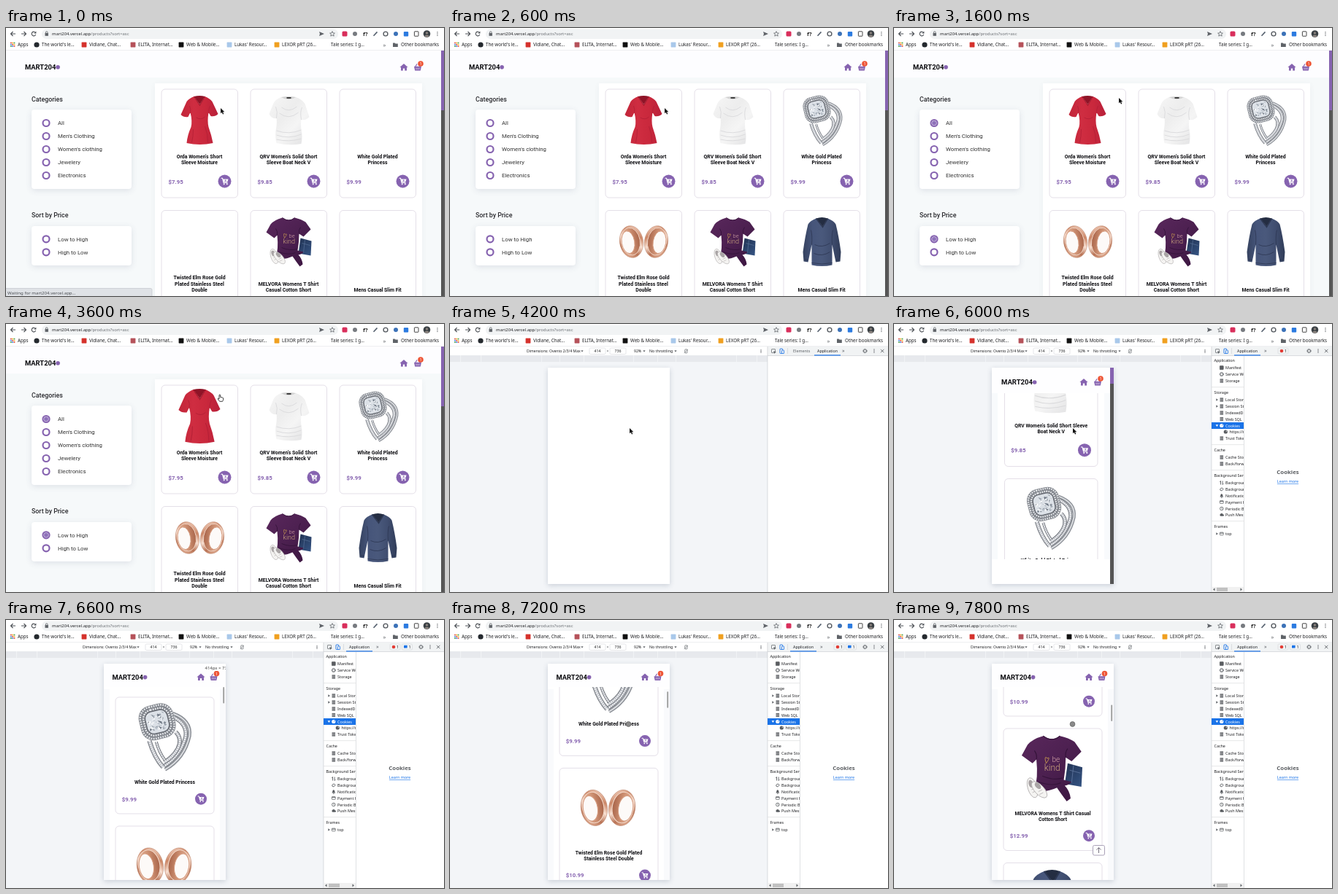
An HTML page with a canvas for the animation above (8000 ms loop, 600 by 368 pixels).

```html
<!DOCTYPE html>
<html lang="en">
<head>
<meta charset="utf-8">
<title>Shop demo</title>
<style>
html, body { margin: 0; width: 100%; height: 100%; overflow: hidden; background: #fff; }
canvas { display: block; width: 600px; height: 368px; }
</style>
</head>
<body>
<canvas id="stage"></canvas>
<script>
const W = 600, H = 368, LOOP = 8000, STEP = 200;
const UI = '"Noto Sans", sans-serif', WEB = 'Roboto, sans-serif';
const PURPLE = '#8663b0', INK = '#202124', GREY = '#5f6368', BLUE = '#1a73e8';
const canvas = document.getElementById('stage');
const c = canvas.getContext('2d');
const dpr = window.devicePixelRatio || 1;
canvas.width = W * dpr;
canvas.height = H * dpr;

function rect(x, y, w, h, fill) { c.fillStyle = fill; c.fillRect(x, y, w, h); }

function paint(fill, stroke, lw) {
  if (fill) { c.fillStyle = fill; c.fill(); }
  if (stroke) { c.strokeStyle = stroke; c.lineWidth = lw; c.stroke(); }
}

function box(x, y, w, h, r, fill, stroke, lw = 0.7) {
  c.beginPath();
  c.roundRect(x, y, w, h, r);
  paint(fill, stroke, lw);
}

function oval(x, y, rx, ry, turn, fill, stroke, lw = 1) {
  c.beginPath();
  c.ellipse(x, y, rx, ry, turn, 0, 7);
  paint(fill, stroke, lw);
}

function dot(x, y, r, fill, stroke, lw) { oval(x, y, r, r, 0, fill, stroke, lw); }

function shape(d, fill) { c.fillStyle = fill; c.fill(new Path2D(d)); }

function line(d, color, lw = 1) {
  c.strokeStyle = color;
  c.lineWidth = lw;
  c.stroke(new Path2D(d));
}

function fade(x1, y1, x2, y2, ...colors) {
  const g = c.createLinearGradient(x1, y1, x2, y2);
  colors.forEach((col, i) => g.addColorStop(i / (colors.length - 1), col));
  return g;
}

function text(s, x, y, size, color = INK, font = UI, weight = 400, align = 'left') {
  c.font = `${weight} ${size}px ${font}`;
  c.fillStyle = color;
  c.textAlign = align;
  c.fillText(s, x, y);
  return c.measureText(s).width;
}

function at(x, y, scale, draw) {
  c.save();
  c.translate(x, y);
  c.scale(scale, scale);
  draw();
  c.restore();
}

function clipTo(x, y, w, h, draw) {
  c.save();
  c.beginPath();
  c.rect(x, y, w, h);
  c.clip();
  draw();
  c.restore();
}

function shadowed(draw, blur = 8, color = 'rgba(70,80,110,.14)') {
  c.save();
  c.shadowColor = color;
  c.shadowBlur = blur * dpr;
  c.shadowOffsetY = 2 * dpr;
  draw();
  c.restore();
}

function seeded(seed) {
  return () => (seed = (seed * 16807) % 2147483647) / 2147483647;
}

// Product art: each fits a 70 by 70 box around the origin.
function redTop() {
  shape('M-8-33Q-15-30-18-26L-26-8Q-22-4-16-5L-13-11Q-10 1-12 9Q-17 20-18 31Q0 35 18 31Q16 20 12 9Q10 1 12-11L15-6Q21-5 25-9L17-26Q14-30 7-33L0-21Z',
    fade(-24, 0, 24, 0, '#c3263a', '#cf2d41', '#c9283c', '#b9203a'));
  shape('M-8-33Q0-35 7-33L0-22Z', '#8f1427');
  line('M-8-33L0-21L7-33', '#a81a2e', 1.2);
  line('M-13-10Q-12-16-14-20M12-10Q12-16 14-20M-9 12Q-9 22-11 30M7 8Q11 18 11 30M-5-4Q2 0 7-5', '#b11f35', 0.8);
}

function whiteTop() {
  shape('M-11-32Q-18-29-21-24L-27-9Q-24-2-17-3Q-16 4-18 14Q-19 24-17 31Q0 35 17 32Q19 22 17 13Q16 4 17-1Q24 0 28-5L22-23Q18-29 10-32Q0-27-11-32Z',
    fade(-24, -20, 22, 24, '#f3f3f3', '#ededed', '#f5f5f5', '#e6e6e7'));
  shape('M-11-32Q0-34 10-32Q0-26-11-32Z', '#d2d2d2');
  rect(-3, -32, 6, 1.8, '#333');
  line('M-17-3Q-15-12-18-19M17-1Q15-12 18-18M-17 14Q0 20 17 13M-17 20Q0 26 17 19M-17 26Q0 30 17 25M-10-18Q0-10 11-19M-13-10Q0 0 13-11', '#dadadc', 0.9);
}

function pave(d, width) {
  line(d, '#70747b', width);
  line(d, '#b9bcc2', width - 1.3);
  c.setLineDash([1.1, 1]);
  line(d, '#f4f5f7', width * 0.45);
  c.setLineDash([]);
}

function diamondRing() {
  line('M9-24Q28-17 26-1Q21 22 1 33.5', '#8c9097', 3.6);
  line('M9-24Q28-17 26-1Q21 22 1 33.5', '#dfe1e4', 1.4);
  pave('M10-20Q24-13 22 0Q17 19 0 30', 4);
  pave('M12-5Q19 2 14 12Q9 21 0 26', 4.2);
  pave('M-15 4Q-10 21-1 31', 4.6);
  pave('M-8 5Q-5 16 1 24', 3);
  c.save();
  c.translate(-7, -15.5);
  c.rotate(-0.24);
  box(-18, -18, 36, 36, 13, '#83878e');
  c.setLineDash([1.3, 1.1]);
  for (const r of [16.4, 13.3]) box(-r, -r, 2 * r, 2 * r, r * 0.7, null, '#e9ebee', 1.9);
  c.setLineDash([]);
  box(-11.5, -11.5, 23, 23, 7, '#dce1e7', '#5f636b', 0.9);
  const rnd = seeded(41), tones = ['#fff', '#8b949f', '#6a737f', '#f3f6f9', '#b5bdc7'];
  for (let i = 0; i < 60; i++) {
    const x = rnd() * 17 - 10, y = rnd() * 17 - 10;
    shape(`M${x} ${y}l${rnd() * 4} ${rnd() * 2}l${-rnd() * 3} ${rnd() * 3}Z`, tones[i % 5]);
  }
  c.restore();
}

function goldRings() {
  for (const side of [-1, 1]) {
    c.save();
    c.translate(side * 17, 0);
    c.scale(side, 1);
    c.rotate(0.16);
    oval(0, 0, 16, 22, 0, fade(-14, -18, 14, 18, '#f6d6c4', '#cc8767', '#f8e0d2', '#b97355', '#e9b99f'), '#b77a5e', 0.5);
    oval(1, -0.5, 13, 19, 0, fade(-12, 0, 13, 0, '#a9654a', '#cf9274', '#e6b69c'), '#f5dccd', 0.9);
    oval(4.5, 0, 8.8, 15.5, 0, '#fdfaf8', '#d69c80', 0.9);
    c.restore();
  }
}

function purpleTee() {
  shape('M16-5L31-1L30 19L13 16Z', fade(15, 0, 30, 16, '#24375a', '#33517f'));
  line('M18 2L29 5M22-3L20 15', '#5a7199', 0.7);
  shape('M-9-33Q-20-30-25-24L-31-13L-20-5L-16-9Q-14 10-18 22Q-8 26 5 20Q9 26 15 34L19 31Q18 23 13 18Q18 17 20 14L12 12Q14 0 14-11L20-7L30-17L23-27Q17-31 8-33Q0-27-9-33Z',
    fade(-24, -20, 18, 26, '#552558', '#4c2050', '#3f1844'));
  line('M-9-33Q0-26 8-33M-16-9Q-15-14-18-18M14-11Q13-16 16-20M-14 14Q0 19 9 15M-10 8Q2 13 11 10', '#35133a', 0.9);
  line('M-7-9q0-4 2-1q3-2 1 2l-2 3z', '#d8a94f', 0.6);
  text('be', 0, -6, 7.5, '#d5a3a8', WEB, 300);
  text('kind', -8, 2.5, 9, '#cfa97f', WEB, 300);
  for (const [x, y, turn] of [[-20, 20, -0.3], [-13, 22, -0.75]]) {
    oval(x, y, 4.8, 10.5, turn, '#f5f4f2', '#b5b2b2', 0.7);
    oval(x - 1.5, y - 4, 2.4, 4, turn, '#a9a4a5');
    line(`M${x - 1} ${y + 2}l4-2M${x} ${y + 5}l4-2`, '#bdb9b9', 0.7);
  }
}

function sweater() {
  const dark = '#2c3752';
  shape('M-8-32Q-16-29-19-24Q-23-8-26 14L-25 27L-19 28L-14 4L-14 32Q0 35 14 32L14 4L19 28L25 27L26 14Q23-8 19-24Q16-29 8-32L1-20Z',
    fade(-26, 0, 26, 0, '#35425f', '#46557a', '#4a597c', '#404e70', '#303c58'));
  shape('M-8-32Q0-35 8-32L1-21Z', '#242d42');
  line('M-8-32L1-20L8-32', dark, 1.5);
  line('M-14 4Q-13-9-15-16M14 4Q13-9 15-16M-14 29Q0 32 14 29M-10 4Q0 9 11 2M-11 16Q0 21 11 14M-24 24L-19 25M24 24L19 25', dark, 0.8);
}

const goods = [
  { art: redTop, desk: ["Orda Women's Short", 'Sleeve Moisture'], tall: ["Orda Women's Short Sleeve", 'Moisture'], price: '$7.95' },
  { art: whiteTop, desk: ["QRV Women's Solid Short", 'Sleeve Boat Neck V'], tall: ["QRV Women's Solid Short Sleeve", 'Boat Neck V'], price: '$9.85' },
  { art: diamondRing, late: 1, desk: ['White Gold Plated', 'Princess'], tall: ['White Gold Plated Princess'], price: '$9.99' },
  { art: goldRings, late: 1, shrink: 0.84, desk: ['Twisted Elm Rose Gold', 'Plated Stainless Steel', 'Double'], tall: ['Twisted Elm Rose Gold Plated', 'Stainless Steel Double'], price: '$10.99' },
  { art: purpleTee, desk: ['MELVORA Womens T Shirt', 'Casual Cotton Short'], tall: ['MELVORA Womens T Shirt Casual', 'Cotton Short'], price: '$12.99' },
  { art: sweater, late: 1, desk: ['Mens Casual Slim Fit'], tall: ['Mens Casual Slim Fit'], price: '$15.99' }
];

function cartButton(x, y, r) {
  dot(x, y, r, PURPLE);
  at(x, y, r / 9, () => {
    line('M-5-4.2H-3L-1.4 2H4', '#fff', 1.1);
    shape('M-2.7-3H5L3.8 1H-1.7Z', '#fff');
    dot(-0.8, 3.8, 1, '#fff');
    dot(3.3, 3.8, 1, '#fff');
    line('M1.2-2.4V0.2M0-1.1H2.4', PURPLE, 0.7);
  });
}

function headerIcons(homeX, basketX, y) {
  at(homeX, y, 1, () => shape('M0-5L5.6 0H4V4.6H1.2V1.4H-1.2V4.6H-4V0H-5.6Z', PURPLE));
  at(basketX, y, 1, () => {
    shape('M-5-1.2H5L3.8 4.6H-3.8Z', PURPLE);
    line('M-3.2-1L-1-4.6M3.2-1L1-4.6', PURPLE, 1.1);
    line('M-2 .6V3M0 .6V3M2 .6V3', '#fff', 0.6);
  });
  dot(basketX + 4, y - 5, 3.8, '#ee5536');
  text('1', basketX + 4, y - 3, 5.4, '#fff', WEB, 400, 'center');
}

function logo(x, y, size) {
  const w = text('MART204', x, y, size, '#0c0c10', WEB, 700);
  dot(x + w + 2.8, y - 3, 2.8, PURPLE);
}

function radio(x, y, label, on) {
  dot(x, y, 4.5, '#fff', PURPLE, 2.2);
  if (on) dot(x, y, 3.2, '#8f72ba', '#c3b3dc', 0.7);
  text(label, x + 16, y + 2.9, 7.8, '#333', WEB);
}

function desktop(t) {
  rect(0, 31, W, 337, '#f6f9fa');
  rect(0, 31, 596, 37, '#fdfdff');
  logo(26, 56.8, 9.4);
  headerIcons(545, 564, 54);
  text('Categories', 35, 101, 8.8, '#2a2a2e', WEB, 500);
  text('Sort by Price', 35, 260, 8.8, '#2a2a2e', WEB, 500);
  shadowed(() => box(35, 112, 137, 109, 4, '#fff'));
  shadowed(() => box(35, 272, 137, 54, 4, '#fff'));
  const ready = t >= 800;
  ['All', "Men's Clothing", "Women's clothing", 'Jewelery', 'Electronics']
    .forEach((s, i) => radio(55, 130.5 + 18 * i, s, ready && i === 0));
  ['Low to High', 'High to Low'].forEach((s, i) => radio(55, 289.8 + 18 * i, s, ready && i === 0));
  shadowed(() => rect(204, 76, 366, 300, '#fff'), 8, 'rgba(70,80,110,.06)');
  goods.forEach((g, i) => {
    const x = 213 + 122 * (i % 3), y = i < 3 ? 84 : 250.5, mid = x + 52;
    box(x, y, 104.5, 149, 5, '#fff', '#d8d2de');
    const zoom = i === 0 && t >= 2600 ? (t >= 2800 ? 1.12 : 1.06) : 1;
    if (!g.late || t >= 400) at(mid + 0.5, y + 43, zoom, g.art);
    const base = (i < 3 ? 187 : 362) - 8.3 * (g.desk.length - 1);
    g.desk.forEach((s, k) => text(s, mid, base + 8.3 * k, 6.9, '#0c0c10', WEB, 700, 'center'));
    text(g.price, x + 9.5, y + 129.5, 7.8, PURPLE, WEB, 700);
    cartButton(x + 86.5, y + 126.5, 9);
  });
  rect(596, 31, 4, 337, '#555');
  rect(596, 31, 4, 82, PURPLE);
  if (t < 400) {
    box(-2, 357.5, 202, 13, 2, '#dfe2e6', '#c4c8cd');
    text('Waiting for mart204.vercel.app…', 2, 365.5, 6.1, '#4a4d52');
  }
}

function mobileCards(o, top, art) {
  let y = top;
  for (const g of goods) {
    const n = g.tall.length, pitch = o.pitch + 7.5 * n, mid = (o.x1 + o.x2) / 2;
    box(o.x1, y, o.x2 - o.x1, pitch - 17, 5, '#fff', '#d8d2de');
    if (art) at(mid - 1, y + o.artY, o.zoom * (g.shrink || 1), g.art);
    g.tall.forEach((s, k) => text(s, mid, y + o.title + 8 * k, 6.8, '#0c0c10', WEB, 700, 'center'));
    text(g.price, o.x1 + 8.8, y + o.price + 7.5 * n, 7.8, PURPLE, WEB, 700);
    cartButton(o.x2 - 18, y + o.price - 2.8 + 7.5 * n, o.r);
    y += pitch;
  }
}

const narrow = { x1: 151.5, x2: 279, pitch: 170.5, artY: 54, zoom: 1.24, title: 114.5, price: 134, r: 9 };
const wide = { x1: 150, x2: 285, pitch: 169.5, artY: 54.5, zoom: 1.34, title: 118.5, price: 135, r: 8 };

function phone(t) {
  shadowed(() => rect(134, 60, 167, 297, '#fff'), 7, 'rgba(40,60,90,.2)');
  if (t < 4400 || t === 6200) return;
  const reloaded = t > 6200;
  rect(134, 95, 167, 262, '#f9fafc');
  if (reloaded) {
    const scroll = 318.5 * Math.max(0, (t - 7000) / 800);
    clipTo(134, 92, 167, 265, () => {
      rect(142, 92, 151, 265, '#fff');
      mobileCards(wide, -263 - scroll, t >= 6600);
    });
    rect(134, 60, 167, 32, '#fefeff');
    logo(145.5, 81.6, 9.4);
    headerIcons(267, 284.5, 78.5);
    box(297.3, 92 + scroll * 0.077, 1.8, 22.5, 1, '#9b9b9b');
    if (scroll > 100) {
      box(272.5, 309.5, 16, 13.5, 2, '#fff', '#aaa2b8', 1);
      line('M280.5 320V312.6M277.5 315.6L280.5 312.6L283.5 315.6', '#77717f', 1);
    }
    if (t < 7000) {
      clipTo(134, 60, 167, 20, () => {
        rect(271, 61, 30, 9, '#fff');
        text('414px × 736px', 272.5, 68.4, 6, '#444');
      });
    }
    return;
  }
  const top = t <= 5200 ? 25.5 + 84 * Math.min(1, (5200 - t) / 400) : 25.5 - 184 * Math.min(1, (t - 5200) / 800);
  const bottom = t === 6000 ? 323 : 357;
  rect(134, 95, 162, 262, '#fff');
  clipTo(134, 95, 162, bottom - 95, () => {
    rect(134, 95, 162, 262, '#f8fafc');
    rect(142, 95, 146, 262, '#fff');
    mobileCards(narrow, top, true);
  });
  rect(134, 60, 162, 35, '#fefeff');
  logo(147, 83, 9.5);
  headerIcons(260, 279, 80);
  rect(296, 60, 5, 297, '#555');
  rect(296, 60, 5, 22, PURPLE);
}

function deviceArea() {
  rect(0, 31, 435, 337, '#f3f5f8');
  rect(0, 31, 435, 12, '#fff');
  const y = 39.2;
  text('Dimensions: Ovento 2/3/4 Max', 105, y, 5.1, INK);
  text('92%', 252, y, 5.1, INK);
  text('No throttling', 273, y, 5.3, INK);
  for (const x of [181, 266, 309]) shape(`M${x - 1.6} 36.3h3.2l-1.6 2.2z`, GREY);
  for (const [x, s] of [[191, '414'], [219, '736']]) {
    box(x, 33, 22, 8.5, 1.5, '#fff', '#dadce0');
    text(s, x + 11, y, 5.2, INK, UI, 400, 'center');
  }
  text('×', 216, y, 5, GREY, UI, 400, 'center');
  box(321.8, 34.8, 3.2, 5, 0.7, null, GREY, 0.7);
  line('M320.8 39.8L326 34.8', GREY, 0.6);
  dots(426, 37.3, 1.7);
  rect(0, 43, 435, 9, '#e7e9ed');
  for (const d of [34, 67, 92, 175, 203]) {
    for (const s of [-1, 1]) rect(217 + s * d, 43, 1, 9, '#f1f3f5');
  }
}

function dots(x, y, gap) {
  for (const k of [-1, 0, 1]) dot(x, y + k * gap, 0.7, GREY);
}

function gear(x, y) {
  dot(x, y, 2, null, GREY, 1);
  c.setLineDash([0.9, 0.9]);
  dot(x, y, 2.8, null, GREY, 0.8);
  c.setLineDash([]);
}

// Sidebar rows: y, label, and flags for heading, expander, open and indent.
const rows = [
  [50, 'Application', 'h'], [60, 'Manifest'], [69, 'Service Workers'], [78, 'Storage'],
  [94, 'Storage', 'h'], [104, 'Local Storage', 'e'], [113, 'Session Storage', 'e'], [122, 'IndexedDB'],
  [130.5, 'Web SQL'], [139.5, 'Cookies', 'o'], [148, 'https://mart204', 'i'], [157, 'Trust Tokens'],
  [173, 'Cache', 'h'], [183, 'Cache Storage'], [192, 'Back/forward cache'],
  [208, 'Background Services', 'h'], [218, 'Background Fetch'], [227, 'Background Sync'], [236, 'Notifications'],
  [244.5, 'Payment Handler'], [253.5, 'Periodic Background'], [262, 'Push Messaging'],
  [278, 'Frames', 'h'], [288, 'top', 'e']
];

function rowIcon(x, y, i, color) {
  if (i === 9 || i === 10) {
    dot(x, y, 2.6, color);
    dot(x + 1, y - 0.8, 0.6, i === 9 ? BLUE : '#fff');
  } else if (i === 2) {
    gear(x, y);
  } else if (i === 16 || i === 17) {
    line(i === 16 ? `M${x - 1.3} ${y + 2.5}v-5l-1.2 1.4M${x + 1.3} ${y - 2.5}v5l1.2-1.4` : `M${x - 2} ${y + 1}a2.3 2.3 0 0 1 4-2M${x + 2} ${y - 1}a2.3 2.3 0 0 1-4 2`, color, 0.9);
  } else if (i === 18) {
    shape(`M${x - 2.4} ${y + 1.6}q1-1 1-3q1.4-2.6 2.8 0q0 2 1 3zm1.6.5h1.6v.7h-1.6z`, color);
  } else if (i === 20) {
    dot(x, y, 2.3, null, color, 0.8);
    line(`M${x} ${y - 1.3}V${y}l1 .7`, color, 0.7);
  } else if (i === 21) {
    shape(`M${x - 1.6} ${y + 1.8}a1.8 1.8 0 0 1 0-3a2 2 0 0 1 3.6.6a1.2 1.2 0 0 1 0 2.4z`, color);
  } else if (i === 1 || i === 19 || i === 23) {
    const tall = i === 1 ? 2.6 : 1.9;
    box(x - 2.4, y - tall, 4.8, tall * 2, 0.5, i === 1 ? color : null, color, 0.7);
    rect(x - 2.4, y - 1.3, 4.8, 0.9, color);
  } else {
    for (const k of [-1.9, 0, 1.9]) rect(x - 2.3, y + k - 0.7, 4.6, 1.4, color);
  }
}

function devtools(t) {
  const icons = t >= 5400;
  rect(435, 31, 165, 337, '#fff');
  rect(435, 31, 165, 12, '#f1f3f4');
  rect(435, 43, 165, 0.7, '#cbcdd1');
  rect(434.6, 31, 0.7, 337, '#cbcdd1');
  box(440.5, 34.5, 5, 5, 0.5, null, GREY, 0.7);
  shape('M443 37l4 1.4l-1.7.8l-.8 1.8z', GREY);
  box(452, 34, 3.6, 6.4, 0.6, null, BLUE, 0.9);
  box(454.5, 36, 3, 4.5, 0.5, '#f1f3f4', BLUE, 0.8);
  rect(462, 33, 0.6, 8, '#cbcdd1');
  const appX = icons ? 470 : 503;
  if (!icons) text('Elements', 470, 39.3, 5.4, GREY);
  text('Application', appX, 39.3, 5.3, INK);
  rect(appX - 4, 42.3, 36, 1.2, BLUE);
  text('»', icons ? 507 : 537, 39.3, 7, GREY);
  if (icons) {
    box(526, 33, 14, 8, 1.5, null, '#d5d7da', 0.6);
    dot(531, 37, 2.3, '#e23b34');
    text('1', 535, 39.2, 5.4, INK);
  }
  if (t >= 6200) {
    box(542.5, 33, 14, 8, 1.5, null, '#d5d7da', 0.6);
    box(545, 34.8, 4.6, 3.8, 0.5, BLUE);
    text('1', 551.5, 39.2, 5.4, INK);
  }
  gear(568.5, 37);
  dots(581, 37, 2);
  line('M590 34.8L594.4 39.2M594.4 34.8L590 39.2', GREY, 0.9);
  if (t < 4400) return;
  clipTo(435, 44, 44, 317, () => {
    rect(435, 135, 44, 9, BLUE);
    for (const y of [86.5, 165.5, 200.5, 270.5]) rect(435, y, 44, 0.6, '#d5d7da');
    rows.forEach(([y, label, kind], i) => {
      const color = kind === 'o' ? '#fff' : INK;
      const x = kind === 'h' ? 438.5 : kind === 'i' ? 459.5 : 454;
      text(label, x, y + 2, 5.4, color);
      if (kind === 'e') shape(`M441.3 ${y - 1.8}l2.6 1.8l-2.6 1.8z`, GREY);
      if (kind === 'o') shape(`M440.6 ${y - 1.2}h3.6l-1.8 2.6z`, '#fff');
      if (icons && kind !== 'h') rowIcon(x - 5.2, y, i, kind === 'o' ? '#fff' : '#5a5d61');
    });
  });
  rect(479, 44, 0.6, 324, '#cbcdd1');
  rect(435, 361, 44, 7, '#f1f1f1');
  rect(442, 362, 15, 5, '#c1c1c1');
  shape('M439.5 362.5v4l-2.4-2z', GREY);
  shape('M474.5 362.5v4l2.4-2z', GREY);
  text('Cookies', 539.5, 205.6, 7.8, '#5b5e62', UI, 700, 'center');
  const w = text('Learn more', 539.5, 218.2, 5.4, BLUE, UI, 400, 'center');
  rect(539.5 - w / 2, 219, w, 0.6, BLUE);
}

const marks = [
  [42, '#24292e', "The world's le…"], [107, '#d5322c', 'Vidlane, Chat…'], [174, '#b5525a', 'ELITA, Internat…'],
  [240, '#111', 'Web & Mobile…'], [306, '#a9c8ea', "Lukas' Resour…"], [371, '#f0a020', 'LEXOR pRT (26…'], [438, '#fff', 'Tale series: I g…']
];

function browser(t) {
  rect(0, 0, W, 31, '#fff');
  line('M13 8H6.5M9.5 5L6.5 8L9.5 11', '#4d5156', 1.1);
  line('M21 8H27.5M24.5 5L27.5 8L24.5 11', '#4d5156', 1.1);
  if (t === 200 || t === 6200) {
    line('M35.5 5.5L40.5 10.5M40.5 5.5L35.5 10.5', '#4d5156', 1.1);
  } else {
    c.beginPath();
    c.arc(38, 8, 2.8, 0.3, 5.6);
    paint(null, '#4d5156', 1.1);
    shape('M41.4 4.5v3.1h-3.1z', '#4d5156');
  }
  box(49, 1.5, 406, 13.5, 6.7, '#f1f3f4');
  rect(53.5, 7, 4.4, 3.8, GREY);
  line('M54.4 7.2V6a1.3 1.3 0 0 1 2.6 0V7.2', GREY, 0.8);
  const w = text('mart204.vercel.app', 63, 10.4, 5.86, INK);
  text('/products?sort=asc', 63 + w, 10.4, 5.86, '#6b6f74');
  shape('M429 5l7 3l-7 3l1-3z', GREY);
  at(447, 8, 1, () => line('M0-3.4L1-1.1L3.4-.9L1.6.7L2.2 3.1L0 1.8L-2.2 3.1L-1.6.7L-3.4-.9L-1-1.1Z', GREY, 0.8));
  box(460.5, 4.5, 7, 7, 1.6, '#d92f5c');
  dot(478, 8, 3, '#777b80');
  text('f?', 489, 10.8, 7.5, '#222', UI, 700);
  line('M503.5 10.8L508.5 5.4', '#56616f', 1.6);
  dot(520, 8, 2.9, null, '#555a60', 1.4);
  dot(534, 8, 3, '#3c72b8');
  box(544.8, 5, 6.4, 6.4, 1, '#2c7be0');
  box(559.4, 4.8, 5.6, 6.4, 0.5, null, '#444', 1);
  dot(576.5, 8, 4.8, '#3b4145');
  dot(576.5, 6.8, 1.6, '#8d8580');
  oval(576.5, 11, 2.9, 1.6, 0, '#8d8580');
  dots(591, 8, 2.3);

  ['#e04a3f', '#f2b52c', '#43a047', '#4285f4'].forEach((col, k) => {
    for (let i = k; i < 9; i += 4) rect(6 + (i % 3) * 2.3, 19.6 + Math.floor(i / 3) * 2.3, 1.7, 1.7, col);
  });
  text('Apps', 16, 25.3, 6.2);
  marks.forEach(([x, col, label], i) => {
    if (i === 0) dot(x, 23, 3.6, col);
    else box(x - 3.4, 19.6, 6.8, 6.8, 0.6, col);
    text(label, x + 7, 25.3, 6.2);
  });
  text('»', 516.5, 25.5, 7.5, GREY);
  shape('M530 20.5h2.6l1 1h3.2v4.6h-6.8z', GREY);
  text('Other bookmarks', 541, 25.3, 6.3);
  rect(0, 30.4, W, 0.6, '#e3e5e8');
}

function arrow(x, y) {
  const d = `M${x} ${y}v7.2l1.7-1.5l1.3 2.8l1.3-.6l-1.3-2.7h2.3z`;
  line(d, '#fff', 1.2);
  shape(d, '#111');
}

function hand(x, y) {
  const d = `M${x - 1} ${y - 3.5}q.9-1 1.7 0v3q3 0 4 1.3q.3 3-1.2 4.5h-3.8l-2.7-3.6q.3-1.2 2 .2z`;
  shape(d, '#fff');
  line(d, '#111', 0.8);
}

function pointer(t) {
  if (t < 2400) {
    const k = Math.min(1, Math.max(0, (t - 1200) / 400));
    arrow(294 + 14 * k, 110 - 14 * k);
  } else if (t < 4000) {
    const k = Math.min(1, (t - 2200) / 600);
    hand(308 - 15 * k, 97 + 4 * k);
  } else if (t < 6400) {
    arrow(t < 5400 ? 246 : 245, 143);
  } else if (t >= 7000) {
    dot(244.5, 143, 3.4, '#8a8a8a', '#666', 0.8);
  }
}

function draw(t) {
  c.setTransform(dpr, 0, 0, dpr, 0, 0);
  rect(0, 0, W, H, '#fff');
  if (t < 4000) {
    desktop(t);
  } else {
    deviceArea();
    phone(t);
    devtools(t);
  }
  browser(t);
  pointer(t);
}

const start = performance.now();
function tick() {
  const t = (performance.now() - start) % LOOP;
  draw(Math.floor(t / STEP) * STEP);
  requestAnimationFrame(tick);
}
tick();
</script>
</body>
</html>
```
